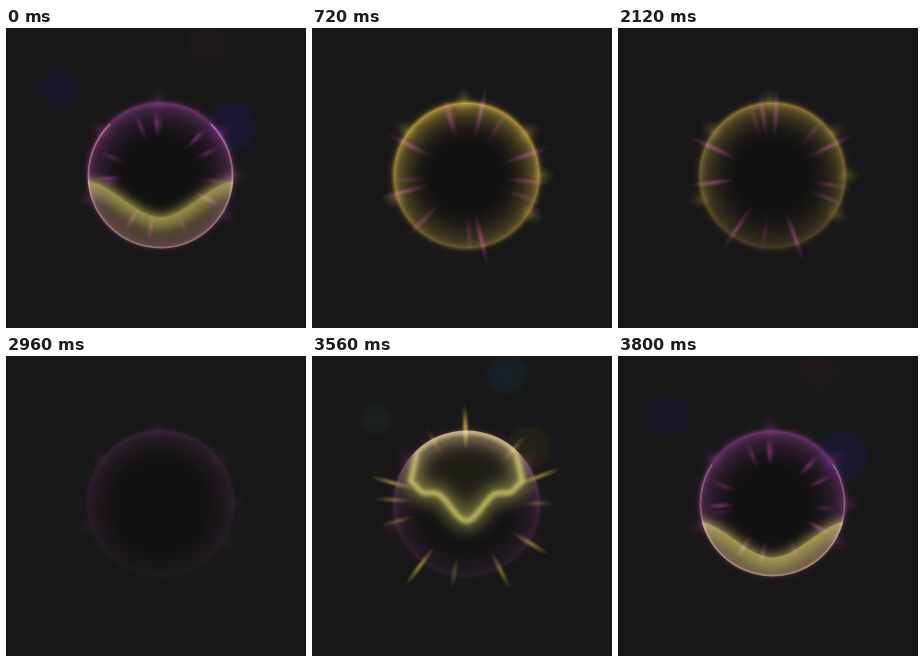
An HTML page with a canvas for the animation above (3.84 s loop, 300 by 300 pixels).

```html
<!DOCTYPE html>
<html lang="en">
<head>
<meta charset="utf-8">
<title>Glowing ring</title>
<style>
html, body { margin: 0; width: 100%; height: 100%; overflow: hidden; background: #171717; }
canvas { display: block; width: 300px; height: 300px; }
</style>
</head>
<body>
<canvas id="stage" width="300" height="300"></canvas>
<script>
const LOOP = 3840, STEP = 40, SIZE = 300;
const CX = 154.5, CY = 147.5, R = 72;
const BURST = 3360, PEAK = 3560, FILL = 3680;
const RAD = Math.PI / 180, TAU = 2 * Math.PI;

const PURPLE = [100, 30, 98], YELLOW = [188, 152, 42], PINK = [195, 78, 118];
const MAGENTA = [105, 28, 92], GOLD = [150, 125, 30], LIME = [220, 214, 84], OLIVE = [165, 155, 55];

const RAY_ANGLES = [-112, -98, -84, -53, -20, 3, 26, 70, 94, 130, 166, 179, 202];
const HORN_ANGLES = [-143, -92, -35, 0, 31, 162];

const ctx = document.getElementById('stage').getContext('2d');
const layer = document.createElement('canvas');
layer.width = layer.height = SIZE;
const lc = layer.getContext('2d');

const clamp = (v, a = 0, b = 1) => Math.min(b, Math.max(a, v));
const lerp = (a, b, k) => a + (b - a) * k;
const mix = (a, b, k) => a.map((v, i) => lerp(v, b[i], k));
const dim = (c, k) => c.map(v => v * k);
const ramp = (t, from, to) => clamp((t - from) / (to - from));
const smooth = v => { const k = clamp(v); return k * k * (3 - 2 * k); };
const rgba = (c, a = 1) => `rgba(${c},${a})`;

// Rise to 1 between a and b, back to 0 between c and d
const pulse = (t, a, b, c, d) => ramp(t, a, b) * (1 - ramp(t, c, d));

function ringColor(t) {
  const steps = [[0, 480, YELLOW], [720, 1520, PINK], [1520, 2120, YELLOW], [2120, 2800, PURPLE]];
  return steps.reduce((c, [from, to, next]) => mix(c, next, ramp(t, from, to)), PURPLE);
}

const ringLevel = t => 1 - .62 * ramp(t, 1600, 2960) - .06 * ramp(t, 2960, 3160) + .68 * ramp(t, BURST, 3800);

function gradient(g, stops, color) {
  for (const [at, a] of stops) g.addColorStop(at, rgba(color, a));
  return g;
}

function streak(angle, from, to, width, color) {
  ctx.save();
  ctx.translate(CX, CY);
  ctx.rotate(angle * RAD);
  ctx.translate((from + to) / 2, 0);
  ctx.scale((to - from) / 2, width);
  ctx.fillStyle = gradient(ctx.createRadialGradient(0, 0, 0, 0, 0, 1), [[0, 1], [.5, .42], [1, 0]], color);
  ctx.fillRect(-1, -1, 2, 2);
  ctx.restore();
}

function ring(t) {
  const level = ringLevel(t), color = dim(ringColor(t), level);
  const edge = R + 8;
  lc.globalCompositeOperation = 'source-over';
  lc.clearRect(0, 0, SIZE, SIZE);
  lc.fillStyle = gradient(lc.createRadialGradient(CX, CY, 0, CX, CY, edge), [
    [.45, 0], [.6, .09], [.72, .24], [.83, .46], [.885, .75], [.9, .92], [.92, .5], [.95, .1], [1, 0]
  ], color);
  lc.fillRect(0, 0, SIZE, SIZE);
  lc.globalCompositeOperation = 'destination-in';
  const fade = lc.createLinearGradient(0, CY - R, 0, CY + R);
  lc.fillStyle = gradient(fade, [[0, 1], [.5, .45 + .35 * level], [1, .5 * level]], [0, 0, 0]);
  lc.fillRect(0, 0, SIZE, SIZE);
  ctx.drawImage(layer, 0, 0);
  for (const a of HORN_ANGLES) streak(a, R - 10, R + 17, 10, dim(color, .3));
}

function rays(t) {
  const flare = pulse(t, BURST, PEAK - 40, PEAK + 20, 3760);
  const power = 1 - ramp(t, 2160, 2760) + ramp(t, BURST, PEAK - 80);
  if (!power) return;
  const calm = ramp(t, 0, 500) * (1 - ramp(t, 2600, BURST));
  const color = dim(mix(MAGENTA, GOLD, flare), power);
  RAY_ANGLES.forEach((base, i) => {
    const phase = t / LOOP * TAU * 3 + i * 2.4;
    const life = .5 + .5 * Math.sin(phase);
    const angle = base + 7 * Math.sin(phase / 3 * 2 + i);
    const from = lerp(38, 54, flare);
    const to = lerp(66, 78, calm) + life * 14 * calm + flare * (20 + 16 * life);
    streak(angle, from, to, 3.8, dim(color, .35 + .6 * life));
  });
}

function bokeh(u) {
  const alpha = pulse(u, BURST, 3480, LOOP, 4040);
  if (!alpha) return;
  const k = ramp(u, PEAK, 3800);
  const spot = (x, y, r, a, b) => {
    const g = ctx.createRadialGradient(x, y, 0, x, y, r);
    ctx.fillStyle = gradient(g, [[0, alpha], [.8, alpha * .75], [1, 0]], mix(a, b, k));
    ctx.fillRect(x - r, y - r, 2 * r, 2 * r);
  };
  spot(lerp(64, 53, k), lerp(63, 60, k), lerp(17, 22, k), [25, 33, 31], [22, 21, 42]);
  spot(lerp(195, 201, k), lerp(18, 15, k), 22, [22, 33, 39], [30, 24, 26]);
  spot(lerp(216, 226, k), lerp(92, 99, k), lerp(24, 27, k), [36, 34, 22], [25, 23, 50]);
}

// Curve from left to right; lift(|dx|) is the height above the middle
function wave(path, y, half, lift) {
  for (let dx = -half; dx <= half; dx += 2) path.lineTo(CX + dx, y - lift(Math.abs(dx)));
}

function glow(path, color, width, blur) {
  ctx.filter = `blur(${blur}px)`;
  ctx.lineWidth = width;
  ctx.strokeStyle = color;
  ctx.stroke(path);
  ctx.filter = 'none';
}

function clipDisc() {
  ctx.beginPath();
  ctx.arc(CX, CY, R + 1, 0, TAU);
  ctx.clip();
}

// Blob that falls from the top of the ring
function drop(u) {
  const alpha = pulse(u, BURST - 40, BURST + 40, 3600, 3720);
  if (!alpha) return;
  const y = lerp(72, 165, (u - BURST) / (PEAK - BURST));
  const size = clamp((y - 50) / 115, .2, 1.2);
  const shoulder = Math.asin(clamp((y - 70 - CY) / R, -.97, .3));
  const path = new Path2D();
  wave(path, y, 56 * size, x => size * (28 * smooth(x / size / 32) + 12 * smooth((x / size - 42) / 16)));
  path.arc(CX, CY, R, shoulder, Math.PI - shoulder, true);
  path.closePath();
  ctx.save();
  clipDisc();
  ctx.globalAlpha = alpha;
  ctx.fillStyle = rgba(LIME, .06);
  ctx.fill(path);
  glow(path, rgba(LIME, .45), 18, 8);
  glow(path, rgba(LIME, .75), 5, 2);
  ctx.restore();
}

// Pool that rises from the bottom while the ring turns yellow
function pool(u) {
  const alpha = pulse(u, 3640, 3720, 3960, 4280);
  if (!alpha) return;
  const y = 189 - (u - LOOP) * .31;
  const flat = 1 - ramp(u, 3780, 3880);
  const lift = x => 36 * smooth(x / 76);
  const front = new Path2D(), body = new Path2D();
  wave(front, y, 76, lift);
  wave(body, y, 76, lift);
  body.lineTo(CX + 76, 240);
  body.lineTo(CX - 76, 240);
  body.closePath();

  ctx.save();
  ctx.globalAlpha = alpha;
  clipDisc();
  ctx.fillStyle = rgba(OLIVE, .1 + .45 * flat);
  ctx.fill(body);
  ctx.translate(0, 4);
  glow(front, rgba(OLIVE, .65 - .2 * flat), 16, 5);
  ctx.translate(0, -3);
  glow(front, rgba(OLIVE, .35), 4, 2);
  ctx.restore();

  const angleAt = v => Math.asin(clamp((v - CY) / R, -1, 1));
  const top = angleAt(y - 93), side = angleAt(y - 34);
  const arc = (from, to, color) => {
    const path = new Path2D();
    path.arc(CX, CY, R, from, to);
    glow(path, color, 1.8, .6);
  };
  ctx.save();
  ctx.globalAlpha = alpha;
  const peach = rgba([200, 145, 100], .6 - .3 * flat);
  arc(top, side, peach);
  arc(Math.PI - side, Math.PI - top, peach);
  arc(side, Math.PI - side, rgba(OLIVE, .4));
  ctx.restore();
}

function draw(t) {
  const u = t < 1000 ? t + LOOP : t;
  ctx.globalCompositeOperation = 'source-over';
  ctx.fillStyle = '#171717';
  ctx.fillRect(0, 0, SIZE, SIZE);
  bokeh(u);
  ctx.fillStyle = gradient(ctx.createRadialGradient(CX, CY, 0, CX, CY, R), [[0, .25], [.65, .25], [1, 0]], [0, 0, 0]);
  ctx.fillRect(0, 0, SIZE, SIZE);
  ctx.globalCompositeOperation = 'screen';
  ring(t);
  rays(t);
  drop(u);
  pool(u);
}

const start = performance.now();
function tick() {
  const t = (performance.now() - start) % LOOP;
  draw(Math.floor(t / STEP) * STEP);
  requestAnimationFrame(tick);
}
tick();
</script>
</body>
</html>
```
